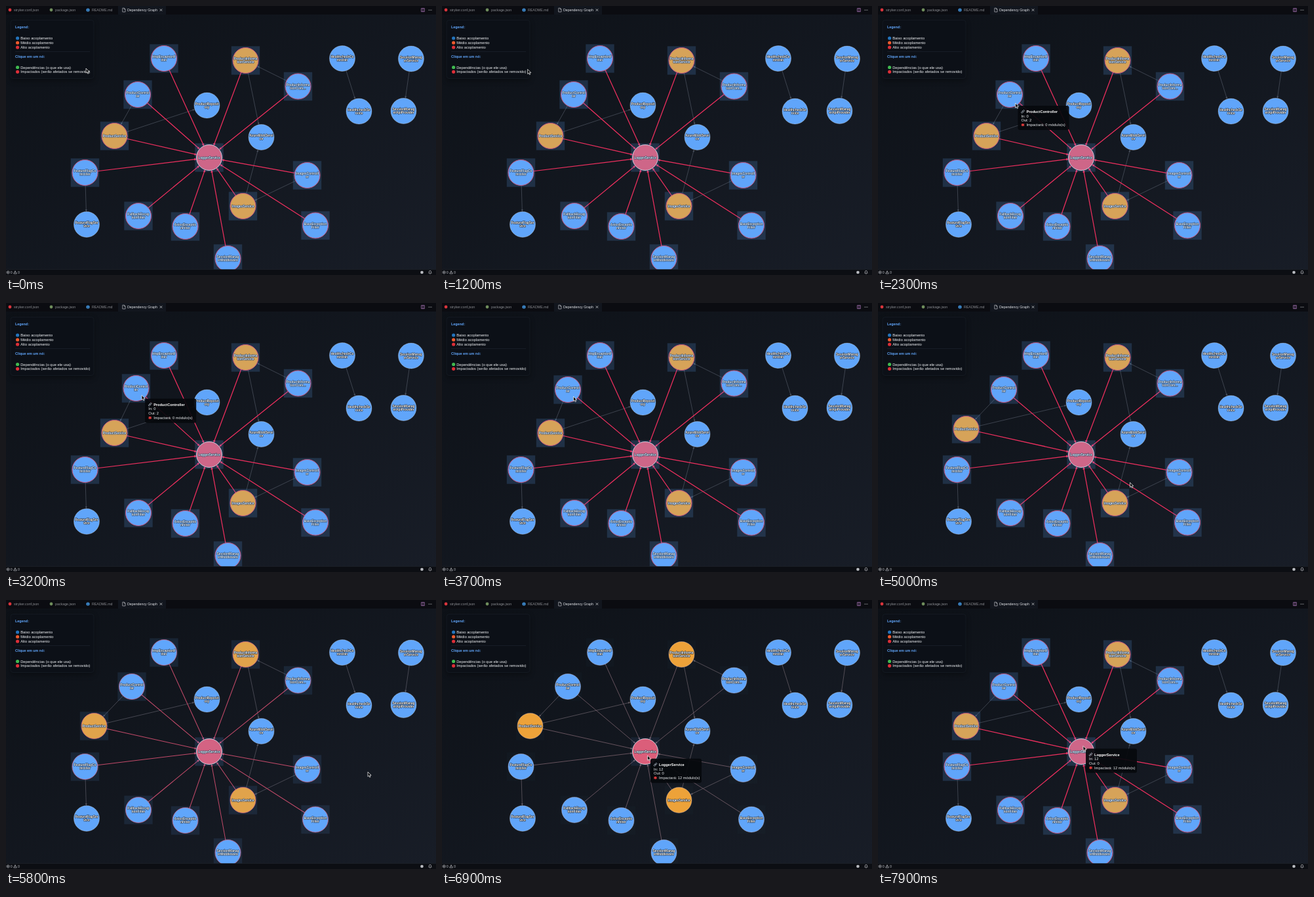
Write an HTML page that moves like this. It is 656 px wide and 410 px high and loops after 8 s.

```html
<!DOCTYPE html>
<html lang="pt">
<head>
<meta charset="utf-8">
<title>Dependency Graph</title>
<style>
  html, body { margin: 0; width: 100%; height: 100%; overflow: hidden; background: #0d1117; }
  svg { display: block; width: 656px; height: 410px; --h: 1; }
  text { font: 5.75px "Liberation Sans", Arial, sans-serif; fill: #f1f3f6; dominant-baseline: central; white-space: pre; }
  .tab { font-size: 5.3px; fill: #8b8d92; }
  .head { font-size: 5.4px; font-weight: bold; fill: #60a5fa; }
  .label { font-size: 4.85px; font-weight: bold; fill: #fff; text-anchor: middle;
    stroke: #18202c; stroke-width: .9px; paint-order: stroke; stroke-linejoin: round; }
  .edge { stroke: color-mix(in srgb, #59606d calc(var(--h) * 100%), #80727a); stroke-width: .6; }
  .edge, .edge.hot { fill: none; stroke-linejoin: round; }
  .edge.hot { stroke: color-mix(in srgb, #ee2f5e calc(var(--h) * 100%), #80727a);
    stroke-width: calc(.65px + var(--h) * .6px); }
  .node circle { stroke: rgba(255, 255, 255, .28); stroke-width: 1; }
  .node.hit circle { stroke: color-mix(in srgb, #dc4464 calc(var(--h) * 100%), rgba(255, 255, 255, .28)); }
  .node.core circle { stroke: rgba(255, 255, 255, .75); }
  .halo { fill: #60a5fa; opacity: calc(var(--h) * .18); }
  .node.core .halo { opacity: calc(.07 + var(--h) * .11); }
  .tip rect { fill: #07090d; opacity: .93; }
  .tip .name { font-size: 5.55px; font-weight: bold; fill: #fff; }
  .icon { fill: none; stroke: #b9bbc0; stroke-width: .7; }
</style>
</head>
<body>
<svg id="stage" viewBox="0 0 656 410" xmlns="http://www.w3.org/2000/svg">
  <defs>
    <linearGradient id="bg" x1="0" y1="0" x2="1" y2="1">
      <stop offset="0" stop-color="#0d1117"/>
      <stop offset="1" stop-color="#181d27"/>
    </linearGradient>
    <filter id="soft" x="-20%" y="-20%" width="140%" height="150%"><feGaussianBlur stdDeviation="4"/></filter>
  </defs>
  <rect width="656" height="410" fill="url(#bg)"/>

  <g id="edges"></g>
  <g id="nodes"></g>

  <!-- legend -->
  <rect x="7" y="24" width="127" height="90" rx="4" fill="#000" opacity=".35" filter="url(#soft)"/>
  <rect x="7" y="21.5" width="127" height="89" rx="4" fill="#0c1017" stroke="#1a202b" stroke-width=".6"/>
  <text class="head" x="14" y="32">Legend:</text>
  <path d="M14 69.5H128" stroke="#222a36" stroke-width=".5"/>
  <text class="head" x="14" y="76.5">Clique em um nó:</text>
  <g id="legend"></g>

  <!-- tab bar -->
  <rect width="656" height="13" fill="#0b0c11"/>
  <rect x="171" width="73" height="13" fill="#12161e"/>
  <circle cx="6" cy="6" r="2.4" fill="#d8343c"/>
  <text class="tab" x="12" y="6.2">stryker.conf.json</text>
  <circle cx="69" cy="6" r="2.4" fill="#6f8d5c"/>
  <text class="tab" x="75" y="6.2">package.json</text>
  <circle cx="125" cy="6" r="2.6" fill="#3f8fd6"/>
  <path d="M125 5.6V7.5M125 4.3V4.9" stroke="#0b0c11" stroke-width=".7"/>
  <text class="tab" x="131" y="6.2">README.md</text>
  <path class="icon" d="M177.8 3.2H180.4L182 4.8V9H177.8ZM180.3 3.3V5H182"/>
  <text class="tab" x="185" y="6.2" style="fill:#e3e5e9">Dependency Graph</text>
  <path class="icon" d="M234.8 4.4L238.2 7.8M238.2 4.4L234.8 7.8" style="stroke:#e3e5e9"/>
  <path class="icon" d="M633.6 3.6H638.4V8.6H633.6ZM636 3.6V8.6" style="stroke:#b77fc4"/>
  <path d="M644.5 6.2h1M646.5 6.2h1M648.5 6.2h1" stroke="#b9bbc0"/>

  <!-- status bar -->
  <rect y="401.5" width="656" height="8.5" fill="#0c0e13"/>
  <path d="M0 401.5H656" stroke="#252a33" stroke-width=".5"/>
  <circle class="icon" cx="3.2" cy="406" r="2.1"/>
  <path class="icon" d="M2.3 405.1L4.1 406.9M4.1 405.1L2.3 406.9M14 403.7L16.4 408H11.6ZM14 405.2V406.6"/>
  <text class="tab" x="6.8" y="406.1" style="fill:#b9bbc0">0</text>
  <text class="tab" x="18" y="406.1" style="fill:#b9bbc0">0</text>
  <circle cx="634.5" cy="406" r="2.3" fill="#b9bbc0"/>
  <path class="icon" d="M644.8 407.2H649.2L648.6 406V405a1.6 1.6 0 0 0-3.2 0V406ZM646.4 408.3H647.6"/>

  <g id="tip" class="tip">
    <rect width="78" height="37" rx="3"/>
    <g fill="none" stroke="#aab4c0" stroke-width=".8" transform="translate(7.5 9) rotate(-45)">
      <rect x="-2.9" y="-1" width="3.2" height="2" rx="1" style="fill:none;opacity:1"/>
      <rect x="-.3" y="-1" width="3.2" height="2" rx="1" style="fill:none;opacity:1"/>
    </g>
    <text class="name" x="13" y="9"></text>
    <text x="5" y="15.8"></text>
    <text x="5" y="22.4"></text>
    <path d="M7.5 26.5l.8 1.5 1.8-.4-.8 1.6.8 1.7-1.8-.4-.8 1.4-.8-1.4-1.8.4.8-1.7-.8-1.6 1.8.4Z" fill="#e23b3b"/>
    <text x="13" y="29.2"></text>
  </g>
  <path id="cursor" d="M0 0V7.2L1.7 5.7L2.8 8.2L4 7.7L2.9 5.2H5.2Z" fill="#08090b" stroke="#fff" stroke-width=".7" stroke-linejoin="round"/>
</svg>

<script>
const LOOP = 8000, R = 19.5;
const $ = id => document.getElementById(id);

function add(parent, tag, attrs, text) {
  const el = document.createElementNS('http://www.w3.org/2000/svg', tag);
  for (const k in attrs) el.setAttribute(k, attrs[k]);
  if (text) el.textContent = text;
  parent.appendChild(el);
  return el;
}

[[49, '#2374bd', 'Baixo acoplamento'], [56, '#ee5a2c', 'Médio acoplamento'],
 [63, '#dd2e38', 'Alto acoplamento'], [93.5, '#3fb950', 'Dependências (o que ele usa)'],
 [100.3, '#dd2e38', 'Impactados (serão afetados se removido)']].forEach(([y, fill, label]) => {
  add($('legend'), 'circle', { cx: 17.6, cy: y, r: 2.6, fill });
  add($('legend'), 'text', { x: 22.2, y }, label);
});

// id: x, y, label lines split by "/"
const nodes = {
  http: [241, 80, 'HttpExceptionF/ilter'],
  infoS: [365.5, 83, 'ProductInforma/tionService'],
  infoC: [445.5, 122.5, 'ProductInforma/tionCont...'],
  prodC: [201, 135, 'ProductControl/ler'],
  repo: [306.5, 151.5, 'ProductReposit/ory'],
  prodS: [165.5, 198, 'ProductService'],
  blob: [389.5, 200, 'AzureBlobServi/ce'],
  flagC: [120.5, 254, 'FeatureFlagCo/ntroller'],
  flagS: [123, 333, 'FeatureFlagSer/vice'],
  fall: [202, 320, 'FallbackExcep/tionFilter'],
  axios: [273.5, 336, 'AxiosExceptio/nFilter'],
  sessM: [338.5, 385, 'SessionManag/erMiddleware'],
  imgS: [361.5, 305, 'ImagesService'],
  imgC: [459.5, 258, 'ImagesControll/er'],
  base: [472, 334.5, 'BaseException/Filter'],
  healC: [513, 80, 'HealthcheckCo/ntroller'],
  healS: [538.5, 160.5, 'HealthcheckSe/rvice'],
  sessS: [618, 80.5, 'SessionManag/erService'],
  sessA: [606.5, 160, 'SessionManag/erApiProvider'],
  logger: [310, 231, 'LoggerService']
};
const users = ['http', 'infoS', 'infoC', 'prodC', 'prodS', 'flagC', 'fall', 'axios', 'sessM', 'imgS', 'imgC', 'base'];
const links = [['prodC', 'prodS'], ['prodS', 'repo'], ['infoC', 'infoS'], ['infoS', 'blob'], ['imgS', 'blob'],
  ['imgC', 'imgS'], ['flagC', 'flagS'], ['healC', 'healS'], ['sessS', 'sessA'], ...users.map(u => [u, 'logger'])];
const fills = { infoS: '#f0a236', prodS: '#f0a236', imgS: '#f0a236', logger: '#e6586f' };

const groups = {};
for (const id in nodes) {
  const core = id === 'logger', hit = users.includes(id);
  const g = groups[id] = add($('nodes'), 'g', { class: 'node' + (core ? ' core' : hit ? ' hit' : '') });
  add(g, 'circle', { r: R, fill: fills[id] || '#60a5fa' });
  const lines = nodes[id][2].split('/');
  lines.forEach((s, i) => add(g, 'text', { class: 'label', y: (i - (lines.length - 1) / 2) * 5 }, s));
  if (core || hit) add(g, 'rect', { class: 'halo', x: -21.7, y: -21.7, width: 43.4, height: 43.4 });
}
const edges = links.map(([from, to]) =>
  ({ from, to, el: add($('edges'), 'path', { class: to === 'logger' ? 'edge hot' : 'edge' }) }));

// time, x, y
const path = [[0, 122, 95], [700, 122, 95], [1300, 134, 97], [1500, 170, 115], [1750, 208, 146], [2300, 209.5, 148],
  [2900, 209.5, 145.5], [3200, 207, 140.5], [3500, 200.5, 142.5], [3700, 200.5, 142.5], [3950, 172, 202],
  [4060, 172, 202], [4300, 155, 197], [4520, 141, 196], [4700, 141, 196], [5050, 415, 278], [5500, 552, 262],
  [6000, 552, 262], [6600, 318, 242], [6900, 313.5, 237], [7100, 313.5, 237], [7600, 313, 222.5], [8000, 313, 222.5]];
const glow = [[0, 1], [5600, 1], [5800, .6], [6150, 0], [6820, 0], [6900, .08], [7250, 1], [8000, 1]];
const drags = { prodC: [2900, 3500], prodS: [4060, 4520] };
const tips = [[1700, 3680, 'ProductController', 0, 2, 0], [3900, 4760, 'ProductService', 1, 2, 1],
  [6560, 8000, 'LoggerService', 12, 0, 12]];

// Monotone cubic interpolation through the keys of one column
function sample(keys, col, t) {
  const last = keys.length - 2;
  let i = 0;
  while (i < last && t >= keys[i + 1][0]) i++;
  const slope = j => j < 0 || j > last ? 0 : (keys[j + 1][col] - keys[j][col]) / (keys[j + 1][0] - keys[j][0]);
  const tangent = j => {
    const a = slope(j - 1), b = slope(j);
    return a * b > 0 ? 2 * a * b / (a + b) : 0;
  };
  const d = keys[i + 1][0] - keys[i][0], u = Math.min(1, Math.max(0, (t - keys[i][0]) / d)), v = 1 - u;
  return keys[i][col] * v * v * (1 + 2 * u) + keys[i + 1][col] * u * u * (3 - 2 * u)
    + d * u * v * (tangent(i) * v - tangent(i + 1) * u);
}
const pointer = t => [sample(path, 1, t), sample(path, 2, t)];
const move = (el, x, y) => el.setAttribute('transform', `translate(${x.toFixed(2)} ${y.toFixed(2)})`);

function place(id, t) {
  const [x, y] = nodes[id], drag = drags[id];
  if (!drag) return [x, y];
  const a = pointer(drag[0]), b = pointer(Math.min(drag[1], Math.max(drag[0], t)));
  return [x + b[0] - a[0], y + b[1] - a[1]];
}

function drawEdge({ from, to, el }, at) {
  const [x1, y1] = at[from], [x2, y2] = at[to];
  const len = Math.hypot(x2 - x1, y2 - y1), ux = (x2 - x1) / len, uy = (y2 - y1) / len;
  const point = (back, side) => `${(x2 - ux * back - uy * side).toFixed(2)} ${(y2 - uy * back + ux * side).toFixed(2)}`;
  const tip = R + .8, tail = tip + 2.2;
  el.setAttribute('d', `M${x1} ${y1}L${point(tip, 0)}M${point(tail, 1)}L${point(tip, 0)}L${point(tail, -1)}Z`);
}

const tipText = $('tip').querySelectorAll('text');
function drawTip(t) {
  const tip = tips.find(([a, b]) => t >= a && t < b);
  $('tip').style.display = tip ? '' : 'none';
  if (!tip) return;
  const [start, , name, used, uses, hit] = tip;
  [name, `In: ${used}`, `Out: ${uses}`, `Impactará: ${hit} módulo(s)`].forEach((s, i) => tipText[i].textContent = s);
  const [x, y] = pointer(Math.max(start, t - 100));
  move($('tip'), x + 4, y + 4);
}

function frame() {
  const t = performance.now() % LOOP, at = {};
  for (const id in nodes) {
    at[id] = place(id, t);
    move(groups[id], ...at[id]);
  }
  edges.forEach(e => drawEdge(e, at));
  $('stage').style.setProperty('--h', sample(glow, 1, t).toFixed(3));
  drawTip(t);
  move($('cursor'), ...pointer(t));
  requestAnimationFrame(frame);
}
frame();
</script>
</body>
</html>
```
